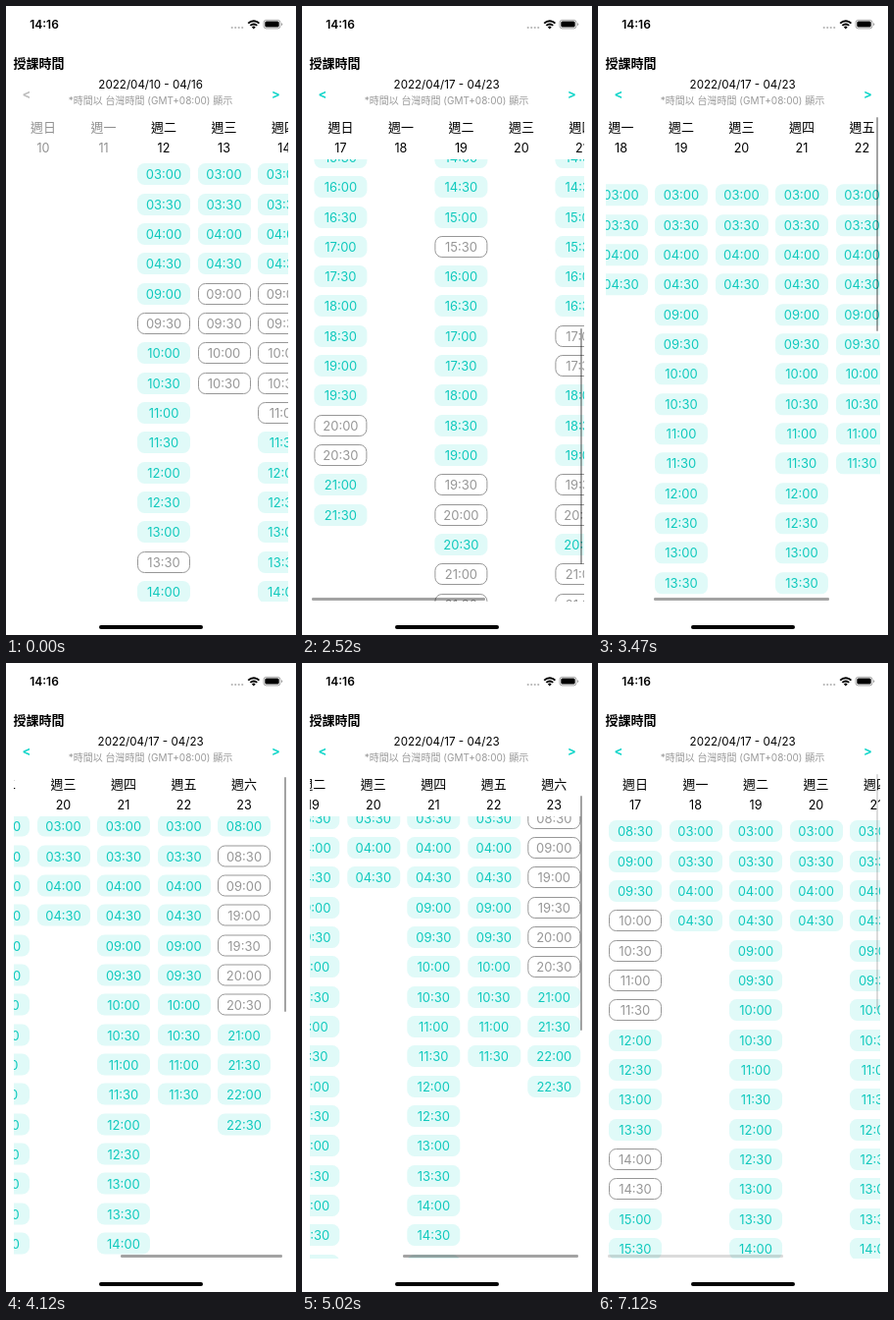
These frames come from a looping animation (296 px wide and 640 px high, 7170 ms). An HTML page:

```html
<!DOCTYPE html>
<html lang="zh-Hant">
<head>
<meta charset="utf-8">
<title>授課時間</title>
<style>
  html, body { margin: 0; width: 100%; height: 100%; overflow: hidden; background: #fff; }
  body { position: relative; font-family: Inter, "Noto Sans CJK TC", "Noto Sans CJK JP", sans-serif; color: #000; }
  body *, .mid { position: absolute; white-space: nowrap; }
  .mid { transform: translate(-50%, -50%); line-height: 1; }
  #stage { left: 0; top: 0; width: 296px; height: 640px; overflow: hidden; }
  #clock { left: 39px; top: 19px; font-size: 12px; font-weight: 600; }
  #title { left: 7.6px; top: 49.4px; font-size: 13px; line-height: 18px; font-weight: 700; }
  #dates { left: 147.6px; top: 81.3px; font-size: 11.6px; }
  #note { left: 147.5px; top: 96px; font-size: 10px; color: #999; }
  .arrow { top: 89.3px; font-size: 13px; font-weight: 700; color: #14d6ca; }
  .arrow.dim { color: #bdbdbd; }
  #home { left: 95px; top: 630px; width: 106px; height: 4px; border-radius: 2px; background: #000; }
  .heads, .slots { left: 8px; width: 280px; overflow: hidden; }
  .heads { top: 112px; height: 44px; }
  .slots { top: 156px; height: 450px; }
  .strip { left: 0; top: 0; }
  .day { top: 10.5px; font-size: 13px; }
  .num { top: 33.2px; font-size: 12.6px; }
  .past { color: #909090; }
  .slot { box-sizing: border-box; width: 54px; height: 22px; border-radius: 7.5px; text-align: center;
          font-size: 13px; line-height: 22px; background: #e0faf8; color: #10c9bd; }
  .slot.off { background: #fff; color: #979797; border: 1px solid #979797; line-height: 20px; }
  .bar { background: #000; border-radius: 1.2px; }
  #vbar { left: 283.7px; width: 2.4px; }
  #hbar { top: 602.2px; height: 2.4px; }
</style>
</head>
<body>
<div id="stage">
  <div id="clock" class="mid">14:16</div>
  <svg width="296" height="40" style="left:0;top:0">
    <g fill="#b5b5b5">
      <circle cx="230.7" cy="22" r="1.1"/><circle cx="234.2" cy="22" r="1.1"/>
      <circle cx="237.7" cy="22" r="1.1"/><circle cx="241.2" cy="22" r="1.1"/>
    </g>
    <g fill="none" stroke="#000" stroke-width="1.9">
      <path d="M247.2 17.6a8 8 0 0 1 11.2 0M249.4 19.9a4.8 4.8 0 0 1 6.8 0"/>
    </g>
    <path d="M252.8 23.4l-1.9-2a2.7 2.7 0 0 1 3.8 0z"/>
    <rect x="263" y="14.3" width="17" height="8.6" rx="2.6" fill="none" stroke="#000" stroke-opacity=".4" stroke-width=".9"/>
    <rect x="264.3" y="15.6" width="14.4" height="6" rx="1.5"/>
    <path d="M281.2 17.2v2.8q1-.3 1-1.4t-1-1.4z" fill-opacity=".45"/>
  </svg>
  <div id="title">授課時間</div>
  <div id="prev" class="mid arrow" style="left:21px">&lt;</div>
  <div id="next" class="mid arrow" style="left:275.5px">&gt;</div>
  <div id="dates" class="mid"></div>
  <div id="note" class="mid">*時間以 台灣時間 (GMT+08:00) 顯示</div>
  <div id="weeks"></div>
  <svg id="spinner" width="32" height="32" style="left:132px;top:304px"></svg>
  <div id="vbar" class="bar"></div>
  <div id="hbar" class="bar"></div>
  <div id="home"></div>
</div>
<script>
const LOOP = 7170, COL = 61.5, ROW = 30.32;
const $ = id => document.getElementById(id);

function add(parent, cls, text = '') {
  const el = document.createElement('div');
  el.className = cls;
  el.textContent = text;
  parent.append(el);
  return el;
}

const clock = h => String(Math.floor(h)).padStart(2, '0') + (h % 1 ? ':30' : ':00');

// open: ranges of hours, off: slots that are taken
const day = (open = [], off = []) => ({ open, off });
const early = [3, 4.5];
const evening = [19.5, 20, 21, 21.5];

const weeks = [
  { first: 10, past: 2, days: [
    day(), day(),
    day([early, [9, 14]], [9.5, 13.5]),
    day([early, [9, 10.5]], [9, 9.5, 10, 10.5]),
    day([early, [9, 14]], [9, 9.5, 10, 10.5, 11]),
    day(), day()
  ] },
  { first: 17, past: 0, days: [
    day([[8.5, 21.5]], [10, 10.5, 11, 11.5, 14, 14.5, 20, 20.5]),
    day([early]),
    day([early, [9, 22.5]], [15.5, ...evening]),
    day([early]),
    day([early, [9, 22.5]], [17, 17.5, ...evening]),
    day([early, [9, 11.5]]),
    day([[8, 9], [19, 22.5]], [8.5, 9, 19, 19.5, 20, 20.5])
  ] }
].map(buildWeek);

function buildWeek({ first, past, days }) {
  const root = add($('weeks'), 'week');
  const heads = add(add(root, 'heads'), 'strip');
  const slots = add(add(root, 'slots'), 'strip');
  days.forEach(({ open, off }, i) => {
    const mid = 30 + i * COL, dim = i < past ? ' past' : '';
    add(heads, 'mid day' + dim, '週' + '日一二三四五六'[i]).style.left = mid + 'px';
    add(heads, 'mid num' + dim, first + i).style.left = mid + 'px';
    let row = 0;
    for (const [from, to] of open)
      for (let h = from; h <= to; h += 0.5) {
        const slot = add(slots, off.includes(h) ? 'slot off' : 'slot', clock(h));
        slot.style.left = mid - 27 + 'px';
        slot.style.top = 4.4 + ROW * row++ + 'px';
      }
  });
  return { root, heads, slots };
}

$('spinner').innerHTML = [...Array(8).keys()].map(i =>
  `<path d="M16 9V3.5" stroke="#8a8a8e" stroke-width="3" stroke-linecap="round"
    opacity="${1 - i * 0.1}" transform="rotate(${-45 * i} 16 16)"/>`).join('');

// Scroll offsets over time: [ms, offset]
const pathX = [[1890, 0], [2520, -1.4], [2840, 0], [3250, 22], [3470, 78.5], [3780, 148],
  [4000, 168], [4120, 164], [4420, 150], [5020, 149.7], [5550, -10], [5970, 0]];
const pathY = [[1890, 3.7], [2200, 210], [2520, 442], [2640, 462], [3250, -14], [3360, -24], [3470, -21],
  [3890, -5], [4120, 5.5], [4560, 250], [5020, 44], [5450, -22], [5970, 0]];

// Slope at a key: flat at turning points, otherwise the mean direction
function slope(p, i) {
  if (!i || i === p.length - 1) return 0;
  const [a, b, c] = [p[i - 1], p[i], p[i + 1]];
  const u = (b[1] - a[1]) / (b[0] - a[0]), v = (c[1] - b[1]) / (c[0] - b[0]);
  return u * v <= 0 ? 0 : 2 * u * v / (u + v);
}

function follow(p, t) {
  if (t < p[0][0]) return 0;
  const i = p.findIndex(k => k[0] > t) - 1;
  if (i < 0) return p[p.length - 1][1];
  const [t0, a] = p[i], [t1, b] = p[i + 1], d = t1 - t0, s = (t - t0) / d;
  const e = s * s * (3 - 2 * s);
  return a + (b - a) * e
    + d * s * (1 - s) * ((1 - s) * slope(p, i) - s * slope(p, i + 1));
}

// The screen refreshes in even bursts: [first, last, count], on 10 ms ticks
const bursts = [[1890, 2520, 7], [2620, 3250, 7], [3360, 4000, 7],
  [4120, 4820, 8], [4920, 5550, 7], [5670, 5970, 4]];
const refreshes = bursts.flatMap(([from, to, n]) =>
  Array.from({ length: n }, (_, i) => from + Math.floor((to - from) * i / (n - 1) / 10) * 10));

const hold = t => refreshes.findLast(r => r <= t) ?? 0;

// Scroll indicator that shrinks when pulled past either end
function indicator(start, length, ratio, pos, max) {
  const over = Math.max(0, -pos, pos - max);
  const at = start + ratio * Math.min(max, Math.max(0, pos)) + (pos > max ? over : 0);
  return [at + 'px', Math.max(8, length - over) + 'px'];
}

function draw(t) {
  const moved = t >= 500, loaded = t >= 650;
  const at = hold(t), x = follow(pathX, at), y = follow(pathY, at);
  $('dates').textContent = moved ? '2022/04/17 - 04/23' : '2022/04/10 - 04/16';
  $('prev').classList.toggle('dim', !moved);
  $('spinner').style.display = moved && !loaded ? '' : 'none';
  weeks.forEach((w, i) => {
    w.root.style.display = loaded === (i === 1) ? '' : 'none';
    w.heads.style.transform = `translateX(${-x}px)`;
    w.slots.style.transform = `translate(${-x}px, ${-y}px)`;
  });
  const v = $('vbar').style, h = $('hbar').style;
  [v.top, v.height] = indicator(113.2, 239.5, 0.486, y, 520);
  [h.left, h.width] = indicator(10.2, 178.5, 0.62, x, 150.5);
  v.opacity = h.opacity = t < 1890 ? 0 : t < 7120 ? 0.36 : 0.14;
}

function tick() {
  draw(performance.now() % LOOP);
  requestAnimationFrame(tick);
}
tick();
</script>
</body>
</html>
```
